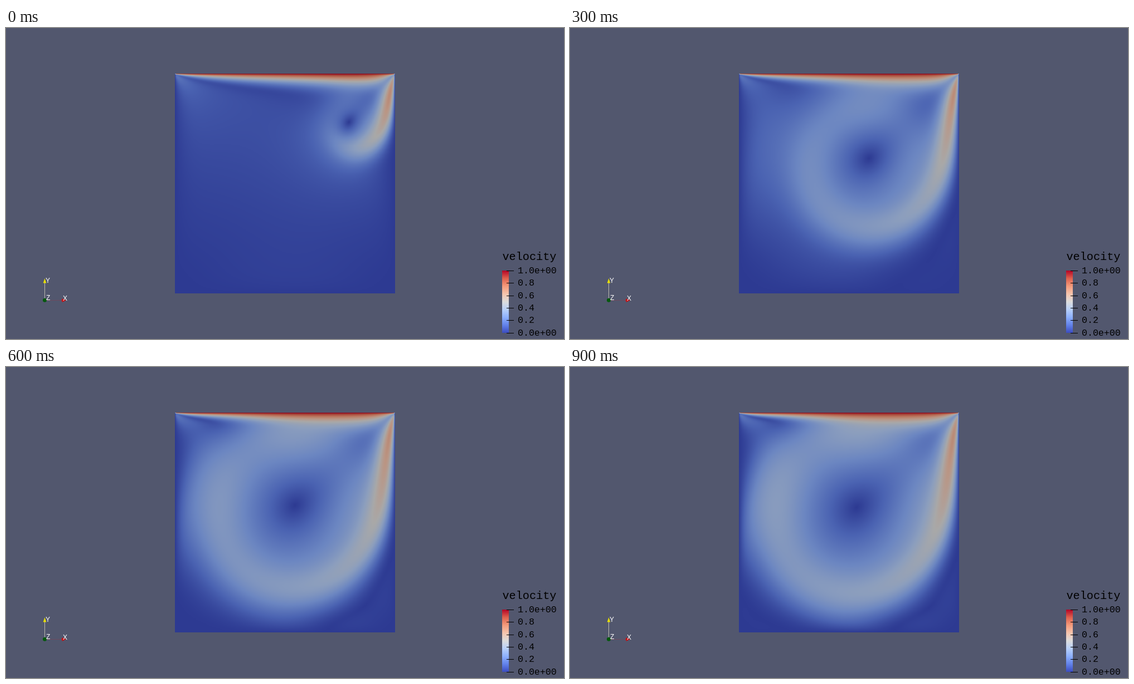
An HTML page with a canvas that plays this animation: 1001x559 px, repeating every 1 s.

```html
<!DOCTYPE html>
<html lang="en">
<head>
<meta charset="utf-8">
<title>Lid-driven cavity</title>
<style>
  html, body { margin: 0; width: 100%; height: 100%; overflow: hidden; background: #52576e; }
  canvas, svg, #bar { position: absolute; }
  canvas { left: 303px; top: 82px; }
  svg { left: 0; top: 0; }
  #bar { left: 890px; top: 436px; width: 12px; height: 112px; }
  .mono { font-family: "Liberation Mono", "Courier New", monospace; }
  .sans { font: 12px "Liberation Sans", Arial, sans-serif; fill: #fff; }
</style>
</head>
<body>
<canvas id="field" width="395" height="395"></canvas>
<div id="bar"></div>
<svg width="1001" height="559">
  <path d="M69.5 489V457" stroke="#b9b9ae"/>
  <path d="M73 489.5H101" stroke="#6d4a5e"/>
  <path d="M69.5 450L72.3 458.5H66.7Z" fill="#e8e000"/>
  <path d="M108 489.5L101 486.3Q98.5 489.5 101 492.7Z" fill="#c01418"/>
  <circle cx="69.5" cy="489.3" r="3.5" fill="#04580c"/>
  <g class="sans">
    <text x="71" y="458">Y</text>
    <text x="72" y="489">Z</text>
    <text x="102" y="490">X</text>
  </g>
  <text class="mono" x="890.5" y="417" font-size="20.2">velocity</text>
  <g id="scale" class="mono" font-size="16.6"></g>
</svg>
<script>
const palette = [
  [59, 76, 192], [98, 130, 234], [141, 176, 254], [184, 208, 249], [221, 221, 221],
  [245, 196, 173], [244, 154, 123], [222, 96, 77], [180, 4, 38]
];
document.getElementById('bar').style.background =
  `linear-gradient(to top, ${palette.map(c => `rgb(${c})`).join()})`;
document.getElementById('scale').innerHTML =
  ['1.0e+00', '0.8', '0.6', '0.4', '0.2', '0.0e+00'].map((label, k) => {
    const y = Math.round(436 + k * 22.35);
    return `<path d="M898 ${y + .5}H911" stroke="#000"/><text x="918" y="${y + 4.5}">${label}</text>`;
  }).join('');

// Cavity flow at Re = 1000: stream function and vorticity on a grid refined at the walls.
// Row 0 is the lid, which moves right with speed 1.
const N = 72, S = N + 1, nu = 1e-3, dt = 0.0025, relax = 1.8, sweeps = 5;
const place = s => s - 0.6 * Math.sin(2 * Math.PI * s) / (2 * Math.PI);
const grid = Float64Array.from({ length: S }, (_, i) => place(i / N));
const array = size => new Float64Array(size);
const lo = array(S), hi = array(S), mid = array(S);
for (let i = 1; i < N; i++) {
  const a = grid[i] - grid[i - 1], b = grid[i + 1] - grid[i];
  mid[i] = 1 / (a + b);
  lo[i] = 2 * mid[i] / a;
  hi[i] = 2 * mid[i] / b;
}
const psi = array(S * S), vort = array(S * S), diag = array(S * S), inv = array(S * S);
let rate = array(S * S), old = array(S * S);
for (let j = 1; j < N; j++) {
  for (let i = 1; i < N; i++) {
    const p = j * S + i;
    diag[p] = lo[i] + hi[i] + lo[j] + hi[j];
    inv[p] = 1 / diag[p];
  }
}

function setWalls() {
  const h = grid[1], k = 2 / (h * h);
  for (let i = 1; i < N; i++) {
    vort[i] = k * (h - psi[S + i]);
    vort[N * S + i] = -k * psi[(N - 1) * S + i];
    vort[i * S] = -k * psi[i * S + 1];
    vort[i * S + N] = -k * psi[i * S + N - 1];
  }
}

function transport(z, f, out) {
  for (let j = 1; j < N; j++) {
    const lj = lo[j], hj = hi[j], mj = mid[j];
    for (let i = 1, p = j * S + 1; i < N; i++, p++) {
      const w = z[p - 1], e = z[p + 1], n = z[p - S], s = z[p + S];
      const u = (f[p + S] - f[p - S]) * mj, v = (f[p - 1] - f[p + 1]) * mid[i];
      out[p] = nu * (lo[i] * w + hi[i] * e + lj * n + hj * s - diag[p] * z[p])
        - u * (e - w) * mid[i] - v * (s - n) * mj;
    }
  }
}

function advance(z, now, before) {
  for (let p = 0; p < z.length; p++) z[p] += dt * (1.5 * now[p] - 0.5 * before[p]);
}

function solve(f, z) {
  for (let j = 1; j < N; j++) {
    const lj = lo[j], hj = hi[j];
    for (let i = 1, p = j * S + 1; i < N; i++, p++) {
      const sum = lj * f[p - S] + hj * f[p + S] + hi[i] * f[p + 1] + z[p] + lo[i] * f[p - 1];
      f[p] += relax * (sum * inv[p] - f[p]);
    }
  }
}

function step() {
  setWalls();
  transport(vort, psi, rate);
  advance(vort, rate, old);
  [rate, old] = [old, rate];
  for (let k = 0; k < sweeps; k++) solve(psi, vort);
}

function vortexCentre() {
  let top = S + 1;
  for (let p = 0; p < psi.length; p++) if (psi[p] > psi[top]) top = p;
  const locate = (k, stride) => {
    const a = psi[top - stride], b = psi[top], c = psi[top + stride];
    return place((k + (a - c) / (2 * (a - 2 * b + c))) / N);
  };
  return { x: locate(top % S, 1), y: locate(Math.floor(top / S), S) };
}

// The pace follows the vortex: it passes these values of y - x one picture apart.
const marks = [-0.572, -0.375, -0.266, -0.205], hits = [], records = [];
let first = 73, gap = 90;
while (records.length <= first + 9 * gap + 1) {
  for (let k = 0; k < 12; k++) step();
  if (hits.length < 4) {
    const { x, y } = vortexCentre();
    if (y > 0.19 && y - x >= marks[hits.length]) hits.push(records.length);
    if (hits.length === 4) {
      const [a, b, c, d] = hits;
      gap = (3 * (d - a) + c - b) / 10;
      first = Math.max(0, (a + b + c + d) / 4 - 1.5 * gap);
    }
  }
  records.push(new Float32Array(psi));
}

const size = 395, light = 0.76;
const ctx = document.getElementById('field').getContext('2d');
const cell = [], part = array(size);
for (let k = 0, i = 0; k < size; k++) {
  const x = (k + 0.5) / size;
  while (grid[i + 1] < x) i++;
  cell[k] = i;
  part[k] = (x - grid[i]) / (grid[i + 1] - grid[i]);
}
const shades = Array.from({ length: 1025 }, (_, k) => {
  const t = k / 128, n = Math.min(7, Math.floor(t));
  return palette[n].map((c, m) => light * (c + (palette[n + 1][m] - c) * (t - n)));
});

function paint(f) {
  const u = array(S * S), v = array(S * S);
  for (let i = 1; i < N; i++) u[i] = 1;
  for (let j = 1; j < N; j++) {
    for (let i = 1; i < N; i++) {
      const p = j * S + i;
      u[p] = (f[p + S] - f[p - S]) * mid[j];
      v[p] = (f[p - 1] - f[p + 1]) * mid[i];
    }
  }
  const image = ctx.createImageData(size, size), data = image.data;
  for (let y = 0, o = 0; y < size; y++) {
    const b = part[y];
    for (let x = 0; x < size; x++, o += 4) {
      const p = cell[y] * S + cell[x], a = part[x];
      const blend = q => (1 - b) * (q[p] + a * (q[p + 1] - q[p]))
        + b * (q[p + S] + a * (q[p + S + 1] - q[p + S]));
      const du = blend(u), dv = blend(v);
      const speed = Math.min(1, Math.sqrt(du * du + dv * dv)) || 0;
      const shade = shades[Math.round(speed * 1024)];
      data[o] = shade[0];
      data[o + 1] = shade[1];
      data[o + 2] = shade[2];
      data[o + 3] = 255;
    }
  }
  return image;
}
const pictures = Array.from({ length: 10 }, (_, k) => paint(records[Math.round(first + k * gap)]));
records.length = 0;

const start = performance.now();
let shown = -1;
function show(now) {
  const k = Math.floor(Math.max(0, now - start) % 1000 / 100);
  if (k !== shown) ctx.putImageData(pictures[shown = k], 0, 0);
  requestAnimationFrame(show);
}
show(start);
</script>
</body>
</html>
```
